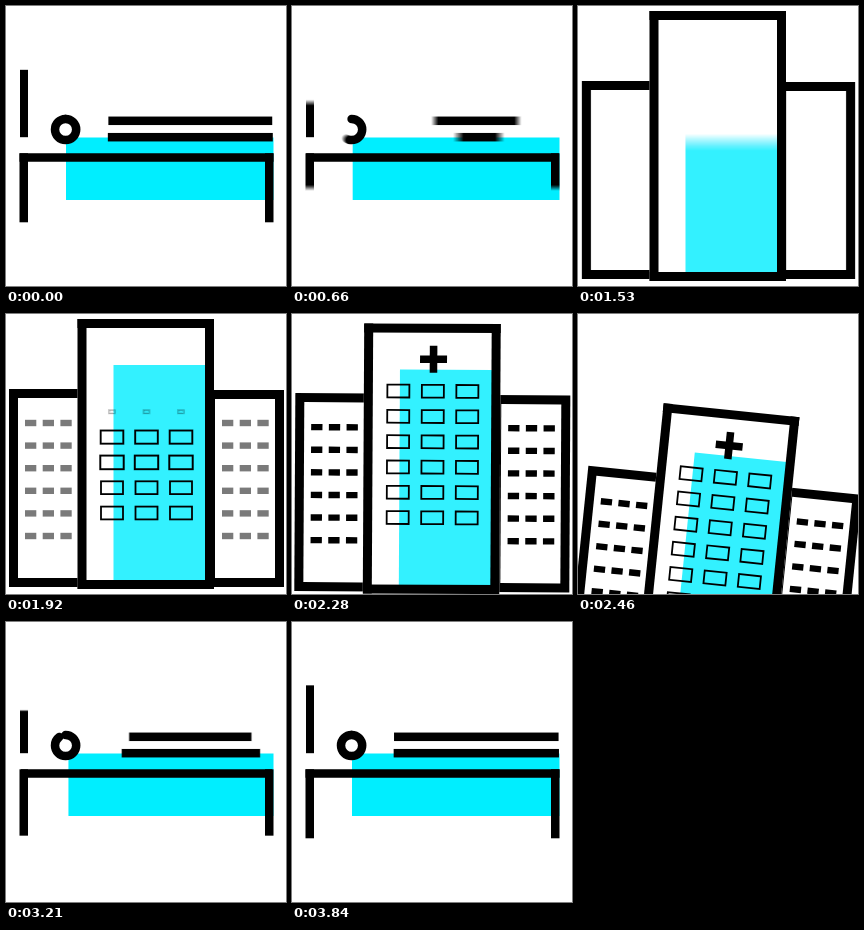
Write an HTML page with a canvas that moves like this. It is 280 px wide and 280 px high and loops after 3870 ms.

```html
<!DOCTYPE html>
<html lang="en">
<head>
<meta charset="utf-8">
<title>Hospital bed and building</title>
<style>
  html, body { margin: 0; width: 100%; height: 100%; overflow: hidden; background: #fff; }
  canvas { display: block; width: 280px; height: 280px; }
</style>
</head>
<body>
<canvas id="stage"></canvas>
<script>
const SIZE = 280, LOOP = 3870, STEP = 30, SHUTTER = 15, SAMPLES = 16;
const WALL = 9, STROKE = 8.5;
const ratio = window.devicePixelRatio || 1;

const stage = document.getElementById('stage');
const buffer = document.createElement('canvas');
for (const c of [stage, buffer]) c.width = c.height = Math.round(SIZE * ratio);
const out = stage.getContext('2d');
const g = buffer.getContext('2d');

const progress = (t, start, length) => Math.min(1, Math.max(0, (t - start) / length));
const outExpo = u => u >= 1 ? 1 : 1 - 2 ** (-10 * u);
const inQuint = u => u ** 5;
const outCubic = u => 1 - (1 - u) ** 3;
const outBack = u => 1 + 2.70158 * (u - 1) ** 3 + 1.70158 * (u - 1) ** 2;

function rect(x0, y0, x1, y1, color = '#000') {
  g.fillStyle = color;
  g.fillRect(x0, y0, x1 - x0, y1 - y0);
}

// Hollow box with walls inside its outer edge
function frame(x0, y0, x1, y1) {
  rect(x0, y0, x1, y1);
  rect(x0 + WALL, y0 + WALL, x1 - WALL, y1 - WALL, '#fff');
}

function centredBar(middle, half, y, part) {
  rect(middle - half * part, y - STROKE / 2, middle + half * part, y + STROKE / 2);
}

function drawBed(t) {
  const entering = t > 2400;
  const inTime = entering ? t : t + 3770;
  const part = (inStart, inLength, outStart) =>
    outExpo(progress(inTime, inStart, inLength)) *
    (entering ? 1 : 1 - inQuint(progress(t, outStart, 500)));

  const sheet = part(2570, 1000, 500);
  const base = part(2570, 1000, 480);
  const legs = part(2740, 1000, 225);
  const ring = part(2880, 1000, 235);
  const upper = part(2960, 1300, 225);
  const lower = part(2900, 1200, 188);
  const post = part(3016, 1400, 225);

  rect(267.5 - 207.5 * sheet, 131.5, 267.5, 194, '#00eeff');
  centredBar(140.5, 127, 151.5, base);
  for (const x of [13.5, 259]) {
    if (legs > 0) rect(x, 147.3, x + STROKE, 147.3 + 69 * legs);
  }
  centredBar(184.3, 83, 114.8, upper);
  centredBar(188 - 3.7 * lower, 83, 131.2, lower);
  rect(14, 131.2 - 69 * post, 22, 131.2);

  if (ring > 0.001) {
    g.lineWidth = STROKE;
    g.lineCap = 'round';
    g.strokeStyle = '#000';
    g.beginPath();
    g.arc(59.6, 123.5, 10.6, -Math.PI / 2, -Math.PI / 2 + 2 * Math.PI * ring);
    g.stroke();
  }
}

function drawWings(t) {
  const slide = 70 * (1 - outCubic(progress(t, 1300, 300)));
  const shade = progress(t, 1770, 300);
  const wing = (x, y, firstColumn) => {
    frame(x, y, x + 78, 273);
    g.globalAlpha = shade;
    for (let row = 0; row < 6; row++) {
      for (let col = 0; col < 3; col++) {
        const wx = firstColumn + col * 17.7, wy = 105.8 + row * 22.6;
        rect(wx, wy, wx + 11.3, wy + 6.4);
      }
    }
    g.globalAlpha = 1;
  };
  wing(3 + slide, 75, 19 + slide);
  wing(200 - slide, 76, 216 - slide);
}

function drawWindows(t) {
  g.strokeStyle = '#000';
  g.lineWidth = 1.8;
  for (let row = 0; row < 6; row++) {
    const scale = outBack(progress(t, 1996 - row * 90, 260));
    if (scale <= 0.01) continue;
    for (let col = 0; col < 3; col++) {
      g.save();
      g.translate(106 + col * 34.5, 72.5 + row * 25.3);
      g.scale(scale, scale);
      g.strokeRect(-11, -6.4, 22, 12.8);
      g.restore();
    }
  }
}

function drawCross(t) {
  const arm = 13.5 * outCubic(progress(t, 1980, 180));
  const half = arm * 0.28;
  rect(141 - arm, 40.5 - half, 141 + arm, 40.5 + half);
  rect(141 - half, 40.5 - arm, 141 + half, 40.5 + arm);
}

function drawTower(t) {
  const top = 275 - 270 * outBack(progress(t, 1050, 384) ** 2);
  rect(71.5, top, 208, 275, '#fff');

  const glass = outCubic(progress(t, 1450, 300));
  rect(107.5, 267 - 216 * glass, 200, 267, '#33f1ff');

  rect(71.5, top, 208, Math.min(275, top + WALL));
  rect(71.5, top, 80.5, 275);
  rect(199, top, 208, 275);
  const floor = 68 * outCubic(progress(t, 1290, 160));
  rect(139.75 - floor, 266, 139.75 + floor, 275);

  drawWindows(t);
  drawCross(t);
}

function drawBuilding(t, frameTime) {
  if (t < 1050 || frameTime > 2650) return;
  const fall = progress(frameTime, 2200, 420) ** 2.5;
  g.save();
  g.translate(140, 140 + 300 * fall);
  g.rotate(fall * 19.5 * Math.PI / 180);
  g.translate(-140, -140);
  if (t > 1300) drawWings(t);
  drawTower(t);
  g.restore();
}

function drawScene(t, frameTime) {
  g.setTransform(ratio, 0, 0, ratio, 0, 0);
  rect(0, 0, SIZE, SIZE, '#fff');
  drawBed(t);
  drawBuilding(t, frameTime);
}

// Average several moments inside the shutter for motion blur
function render(time) {
  for (let i = 0; i < SAMPLES; i++) {
    const shift = ((i + 0.5) / SAMPLES - 0.5) * SHUTTER;
    drawScene(Math.max(0, time + shift), time);
    out.globalAlpha = 1 / (i + 1);
    out.drawImage(buffer, 0, 0);
  }
}

const begin = performance.now();
let shown = -1;
function tick() {
  const elapsed = (performance.now() - begin) % LOOP;
  const time = Math.floor(elapsed / STEP) * STEP;
  if (time !== shown) render(shown = time);
  requestAnimationFrame(tick);
}
tick();
</script>
</body>
</html>
```
